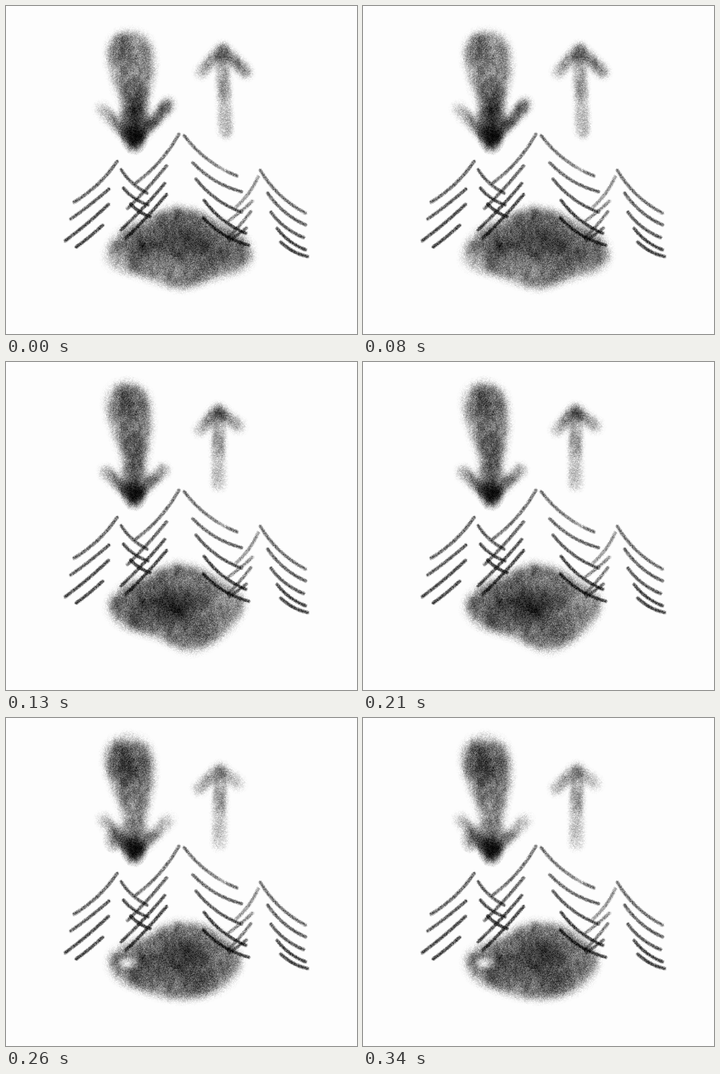
Animation, 774 px wide and 724 px high, one loop 0.39 s. Source, as an HTML page with a canvas:

```html
<!DOCTYPE html>
<html lang="en">
<head>
<meta charset="utf-8">
<title>Charcoal arrows and trees</title>
<style>
  html, body { margin: 0; width: 100%; height: 100%; overflow: hidden; background: #fdfdfd; }
  canvas { display: block; width: 774px; height: 724px; }
</style>
</head>
<body>
<canvas id="stage" width="774" height="724"></canvas>
<script>
const W = 774, H = 724, STEP = 130, PAPER = 253;
const stage = document.getElementById('stage').getContext('2d');

const clamp = v => Math.min(1, Math.max(0, v));
const ease = t => t * t * (3 - 2 * t);
const mix = (a, b, t) => a + (b - a) * t;
const ink = tone => `rgba(0,0,0,${tone})`;

function layer() {
  const c = document.createElement('canvas');
  c.width = W;
  c.height = H;
  return c.getContext('2d', { willReadFrequently: true });
}

// Seeded generator, so the grain is the same on every load.
function random(seed) {
  return () => {
    seed = (seed + 0x6D2B79F5) | 0;
    let t = Math.imul(seed ^ (seed >>> 15), 1 | seed);
    t = (t + Math.imul(t ^ (t >>> 7), 61 | t)) ^ t;
    return ((t ^ (t >>> 14)) >>> 0) / 4294967296;
  };
}

// Paper tooth: fine noise mixed with its right and lower neighbours.
function makeGrain() {
  const rnd = random(71);
  const raw = Float32Array.from({ length: W * H + W + 2 }, () => rnd() + rnd() - 1);
  return i => 1.5 * (raw[i] + (raw[i + 1] + raw[i + W]) * 0.6 + raw[i + W + 1] * 0.36);
}

// Smooth value noise with cells of sx by sy pixels.
function makeSmudge(seed, sx, sy) {
  const rnd = random(seed), cols = Math.ceil(W / sx) + 2, rows = Math.ceil(H / sy) + 2;
  const cell = Float32Array.from({ length: cols * rows }, () => rnd() * 2 - 1);
  return (x, y) => {
    const cx = Math.floor(x / sx), cy = Math.floor(y / sy), i = cy * cols + cx;
    const u = ease(x / sx - cx), v = ease(y / sy - cy);
    return mix(mix(cell[i], cell[i + 1], u), mix(cell[i + cols], cell[i + cols + 1], u), v);
  };
}

// Run a drawing step with soft edges.
function soft(g, blur, paint) {
  g.save();
  g.filter = `blur(${blur}px)`;
  g.lineCap = g.lineJoin = 'round';
  g.beginPath();
  paint();
  g.restore();
}

// Round shade; a negative tone lifts ink off.
function shade(g, x, y, rx, ry, tone) {
  const a = Math.abs(tone), fill = g.createRadialGradient(0, 0, 0, 0, 0, 1);
  fill.addColorStop(0, ink(a));
  fill.addColorStop(0.45, ink(a * 0.6));
  fill.addColorStop(1, ink(0));
  g.save();
  if (tone < 0) g.globalCompositeOperation = 'destination-out';
  g.translate(x, y);
  g.scale(rx, ry);
  g.fillStyle = fill;
  g.fillRect(-1, -1, 2, 2);
  g.restore();
}

// Arrow head in one stroke; tones are those of left end, tip and right end.
function chevron(g, left, tip, right, width, tones) {
  soft(g, 6, () => {
    const fill = g.createLinearGradient(left[0], 0, right[0], 0);
    const middle = (tip[0] - left[0]) / (right[0] - left[0]);
    [0, middle, 1].forEach((at, i) => fill.addColorStop(at, ink(tones[i])));
    g.strokeStyle = fill;
    g.lineWidth = width;
    [left, tip, right].forEach(p => g.lineTo(...p));
    g.stroke();
  });
}

function downArrow(g, { x, top, head, tone, left, right, tones }) {
  const tipX = 283, tipY = 316, neck = 24;
  soft(g, 8, () => {
    const side = s => y => {
      const drop = y - top;
      const cap = Math.sqrt(1 - (1 - clamp(drop / head)) ** 2);
      const taper = clamp((tipY - y) / 36);
      const half = mix(head, neck, ease(clamp((drop - 60) / 130)));
      const center = mix(x, tipX, ease(clamp(drop / 180)));
      g.lineTo(center + s * half * cap * taper, y);
    };
    const ys = Array.from({ length: 60 }, (_, i) => mix(top, tipY, i / 59));
    ys.forEach(side(1));
    ys.reverse().forEach(side(-1));
    g.fillStyle = ink(tone);
    g.fill();
  });
  chevron(g, left, [tipX, 299], right, 25, tones);
  shade(g, tipX, 288, 32, 42, 0.75);
}

function upArrow(g, { tip, left, right, foot, tones, tail }) {
  chevron(g, left, tip, right, 23, tones);
  soft(g, 5, () => {
    const fill = g.createLinearGradient(0, tip[1], 0, foot[1]);
    fill.addColorStop(0, ink(0));
    fill.addColorStop(0.12, ink(0.34));
    fill.addColorStop(0.5, ink(0.38));
    fill.addColorStop(1, ink(tail));
    g.strokeStyle = fill;
    g.lineWidth = 27;
    g.moveTo(...tip);
    g.lineTo(...foot);
    g.stroke();
  });
}

// Closed smooth shape through key points.
function heap(g, tone, points) {
  const n = points.length, at = i => points[(i + n) % n];
  const handle = (i, s) => [0, 1].map(k => at(i)[k] + s * (at(i + 1)[k] - at(i - 1)[k]) / 6);
  soft(g, 8, () => {
    g.moveTo(...at(0));
    for (let i = 0; i < n; i++) {
      g.bezierCurveTo(...handle(i, 1), ...handle(i + 1, -1), ...at(i + 1));
    }
    g.fillStyle = ink(tone);
    g.fill();
  });
}

// One side of a tree: strokes from stem to tip, darker lower down, sagging by a share of their length.
function boughs(g, light, strokes) {
  soft(g, 0.9, () => {
    g.lineWidth = 6.8;
    strokes.forEach(([x0, y0, x1, y1], i) => {
      const dx = x1 - x0, dy = y1 - y0;
      const sag = dx > 0 ? 0.14 : i ? 0.03 : -0.11;
      const bow = dx > 0 ? sag : Math.abs(sag);
      const s = Math.sign(dx);
      g.strokeStyle = ink(Math.min(0.7, light + i * 0.06));
      g.beginPath();
      g.moveTo(x0, y0);
      g.quadraticCurveTo((x0 + x1) / 2 - s * dy * bow, (y0 + y1) / 2 + s * dx * bow, x1, y1);
      g.stroke();
    });
  });
}

function trees(g) {
  boughs(g, 0.56, [[245, 343, 150, 433], [227, 404, 143, 470], [226, 438, 131, 518], [213, 484, 155, 532]]);
  boughs(g, 0.6, [[254, 361, 311, 413], [259, 402, 313, 439], [275, 437, 318, 465]]);
  boughs(g, 0.52, [[381, 283, 286, 391], [354, 353, 268, 447], [350, 392, 254, 494], [354, 416, 265, 512]]);
  boughs(g, 0.52, [[393, 286, 509, 375], [412, 346, 519, 410], [419, 382, 519, 455],
    [437, 429, 529, 502], [435, 468, 535, 528]]);
  boughs(g, 0.36, [[556, 377, 506, 445], [543, 431, 490, 475], [540, 454, 490, 512], [530, 490, 492, 518]]);
  boughs(g, 0.52, [[561, 363, 660, 457], [577, 413, 660, 483], [584, 455, 656, 511],
    [598, 491, 660, 538], [606, 521, 665, 553]]);
  shade(g, 482, 356, 18, 13, -0.6);
}

function highPose(g) {
  downArrow(g, { x: 273, top: 57, head: 48, tone: 0.46,
    left: [212, 228], right: [357, 218], tones: [0.25, 0.75, 0.6] });
  shade(g, 256, 98, 40, 45, 0.3);
  shade(g, 284, 230, 38, 80, 0.8);
  upArrow(g, { tip: [477, 95], left: [431, 146], right: [528, 146], foot: [484, 278],
    tones: [0.26, 0.6, 0.48], tail: 0.25 });
  heap(g, 0.52, [[378, 446], [445, 464], [530, 519], [531, 573], [450, 603],
    [385, 621], [300, 595], [226, 566], [244, 508], [312, 469]]);
  shade(g, 388, 510, 80, 75, 0.55);
  shade(g, 300, 528, 60, 46, 0.5);
  shade(g, 465, 548, 60, 50, 0.45);
  shade(g, 235, 568, 42, 42, -0.35);
}

function middlePose(g) {
  downArrow(g, { x: 267, top: 46, head: 46, tone: 0.5,
    left: [221, 243], right: [345, 239], tones: [0.34, 0.8, 0.34] });
  shade(g, 272, 92, 44, 50, 0.45);
  shade(g, 225, 62, 34, 44, -0.4);
  shade(g, 282, 205, 30, 75, 0.5);
  upArrow(g, { tip: [468, 106], left: [428, 150], right: [513, 142], foot: [469, 270],
    tones: [0.24, 0.68, 0.3], tail: 0.2 });
  heap(g, 0.58, [[378, 447], [440, 464], [515, 514], [515, 558], [465, 612],
    [405, 637], [335, 607], [265, 584], [229, 550], [244, 509], [312, 473]]);
  shade(g, 376, 543, 62, 56, 0.65);
  shade(g, 325, 535, 95, 60, 0.38);
  shade(g, 410, 632, 65, 32, -0.3);
  shade(g, 500, 510, 55, 60, -0.35);
}

function lowPose(g) {
  downArrow(g, { x: 269, top: 40, head: 51, tone: 0.52,
    left: [216, 225], right: [358, 226], tones: [0.26, 0.8, 0.16] });
  shade(g, 272, 38, 55, 28, -0.45);
  shade(g, 268, 104, 52, 56, 0.6);
  smudgeArm(g);
  upArrow(g, { tip: [472, 113], left: [426, 156], right: [512, 145], foot: [471, 277],
    tones: [0.28, 0.46, 0.2], tail: 0.17 });
  heap(g, 0.56, [[375, 453], [448, 464], [506, 513], [513, 551], [480, 592],
    [420, 616], [345, 613], [265, 585], [231, 553], [240, 516], [308, 484]]);
  shade(g, 390, 512, 58, 46, 0.6);
  shade(g, 410, 560, 90, 48, 0.4);
  shade(g, 320, 545, 65, 50, 0.35);
  shade(g, 268, 541, 27, 17, -0.85);
}

// Extra weight under the left arm of the big arrow.
function smudgeArm(g) {
  shade(g, 238, 270, 26, 30, 0.45);
}

const grain = makeGrain();
const streak = makeSmudge(19, 8, 16), patch = makeSmudge(43, 20, 24);

// Turn smooth tone into charcoal and lay it on the paper.
function charcoal(pose) {
  const g = layer();
  pose(g);
  const image = g.getImageData(0, 0, W, H), px = image.data;
  g.clearRect(0, 0, W, H);
  trees(g);
  const line = g.getImageData(0, 0, W, H).data;
  for (let i = 0, k = 3; i < W * H; i++, k += 4) {
    const x = i % W, y = Math.floor(i / W), l = line[k] / 255;
    let d = px[k] / 255;
    d += d * (1 - d) * (streak(x, y) * 0.3 + patch(x, y) * 0.36);
    d = 1 - (1 - d) * (1 - l);
    d += (0.21 + 0.12 * l) * grain(i) * Math.sqrt(Math.max(0, d * (1 - d)));
    px.fill(PAPER * (1 - clamp(d)), k - 3, k);
    px[k] = 255;
  }
  g.putImageData(image, 0, 0);
  return g.canvas;
}

const poses = [highPose, middlePose, lowPose].map(charcoal);
const start = performance.now();

function draw() {
  const t = Math.max(0, performance.now() - start);
  stage.drawImage(poses[Math.floor(t / STEP) % poses.length], 0, 0);
  requestAnimationFrame(draw);
}
draw();
</script>
</body>
</html>
```
